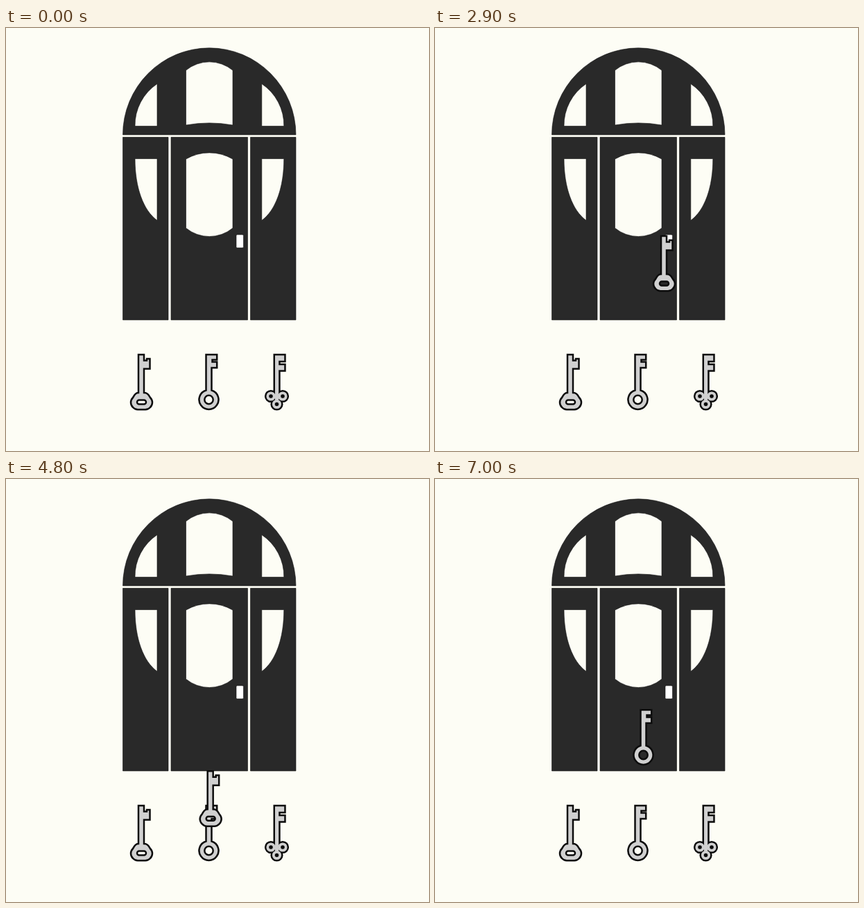
An HTML page for the animation above (7.6 s loop, 610x610 px).

```html
<!DOCTYPE html>
<html lang="en">
<head>
<meta charset="utf-8">
<title>Door and keys</title>
<style>
html, body { margin: 0; width: 100%; height: 100%; overflow: hidden; background: #fdfdf5; }
svg { display: block; width: 610px; height: 610px; }
.key { fill: #d0d0d0; stroke: #0c0c0c; stroke-width: 2.5; fill-rule: evenodd; }
#key3 { stroke-width: 5; fill-rule: nonzero; paint-order: stroke; }
#door { fill: #292929; stroke: #111; stroke-width: .6; }
.glass { fill: #fdfdf5; }
</style>
</head>
<body>
<svg viewBox="0 0 610 610">
  <defs>
    <path id="key1" class="key" d="M191 471H199V479.500H203V477H207.500V491.500H199V526
      C205 526 206 530 208 533C212 537 212 543 208 547Q205 550.300 201 550.300H190Q186 550.300 183 547
      C179 543 179 537 183 533C185 530 186 526 191 526Z
      M192 536.500H199a3 3 0 0 1 0 6H192a3 3 0 0 1 0 -6Z"/>
    <path id="key2" class="key" d="M288.500 471H304.200V478.500H297.500V481.500H304.200V490H296.500V522.500
      A14 14 0 1 1 288.500 522.500Z M286.300 536a6.200 6.200 0 1 0 12.400 0a6.200 6.200 0 1 0 -12.400 0Z"/>
    <circle id="lobe" r="6.600"/>
  </defs>

  <g id="door">
    <path d="M168.500 154A124.500 125 0 0 1 418 154Z M168.500 157.500H234V421H168.500Z
      M238 157.500H348.500V421H238Z M352.500 157.500H418V421H352.500Z"/>
    <g class="glass">
      <path d="M259.500 61A53 53 0 0 1 327 61V140A190 190 0 0 0 259.500 140Z"/>
      <path d="M259.500 189A67 67 0 0 1 327 189V288.500A53 53 0 0 1 259.500 288.500Z"/>
      <g id="side">
        <path d="M186 141.500H218V80.500A72 72 0 0 0 186 141.500Z"/>
        <path d="M186 188.500H218V277.500C198 263 186 230 186 188.500Z"/>
      </g>
      <use href="#side" transform="matrix(-1 0 0 1 586.800 0)"/>
    </g>
    <rect x="332" y="298" width="10.500" height="19" rx="1.500" fill="#fff"/>
  </g>

  <use href="#key1"/>
  <use href="#key2"/>
  <path id="key3" class="key" d="M388 472.200V540H393.200V493.200H401.200V486.200H393.200V479.700H401.200V472.200Z
    M375.400 531a6.600 6.600 0 1 0 13.200 0a6.600 6.600 0 1 0 -13.200 0Z
    m17 0a6.600 6.600 0 1 0 13.200 0a6.600 6.600 0 1 0 -13.200 0Z
    m-8.500 11.500a6.600 6.600 0 1 0 13.200 0a6.600 6.600 0 1 0 -13.200 0Z"/>
  <path d="M382 531h0m17 0h0m-8.500 11.500h0" stroke="#0c0c0c" stroke-width="5.600" stroke-linecap="round"/>
  <use id="held"/>
  <path id="cursor" d="M.5 .8V14L3.600 11.200L5.800 16.500L8.200 15.500L6 10.400H10.800Z" fill="#111" stroke="#fff" stroke-width=".8"/>
</svg>
<script>
const LOOP = 7600, STEP = 100, SWAP = 6400;
const $ = id => document.getElementById(id);
const ramp = (t, a, b) => Math.min(1, Math.max(0, (t - a) / (b - a)));
const easeOut = k => 1 - (1 - k) ** 3;
const mix = (p, q, k) => p.map((v, i) => v + (q[i] - v) * k);

function cursorAt(t) {
  const p = mix([159, 580], [159, 574], ramp(t, 200, 300));
  const left = mix(p, [97, 477], ramp(t, 400, 700));
  return mix(left, [193, 507], ramp(t, 1100, 1700));
}

// Offset of the first key from its place: to the lock, back off, down to the second key.
function firstAt(t) {
  let p = mix([16, 38], [60, -112], ramp(t, 2200, 2400));
  p = mix(p, [135, -171], ramp(t, 2500, 2900));
  p = mix(p, [109, -139], ramp(t, 3700, 4200));
  p = mix(p, [95, -5], ramp(t, 4400, 5000));
  return mix(p, [97, 40], easeOut(ramp(t, 5600, SWAP)));
}

function secondAt(t) {
  const k = ramp(t, SWAP, 7000);
  const [x, y] = mix([-2, 40], [8, -138], k);
  return [x + 10 * Math.sin(Math.PI * k), y];
}

// Swings left, then further right.
function doorAngle(t) {
  const sway = -Math.sin(2 * Math.PI * ramp(t, 3600, 4200));
  return sway * (sway < 0 ? 3.5 : 5.3);
}

function place(el, pos, shown) {
  el.setAttribute('visibility', shown ? 'visible' : 'hidden');
  el.setAttribute('transform', `translate(${pos})`);
}

function draw(now) {
  const t = Math.floor(now % LOOP / STEP) * STEP;
  const second = t >= SWAP;
  $('door').setAttribute('transform', `rotate(${doorAngle(t)} 293 190)`);
  $('held').setAttribute('href', second ? '#key2' : '#key1');
  place($('held'), second ? secondAt(t) : firstAt(t), t >= 2000);
  place($('cursor'), cursorAt(t), t >= 200 && t < 2000);
}

const start = performance.now();
function tick() {
  draw(performance.now() - start);
  requestAnimationFrame(tick);
}
tick();
</script>
</body>
</html>
```
